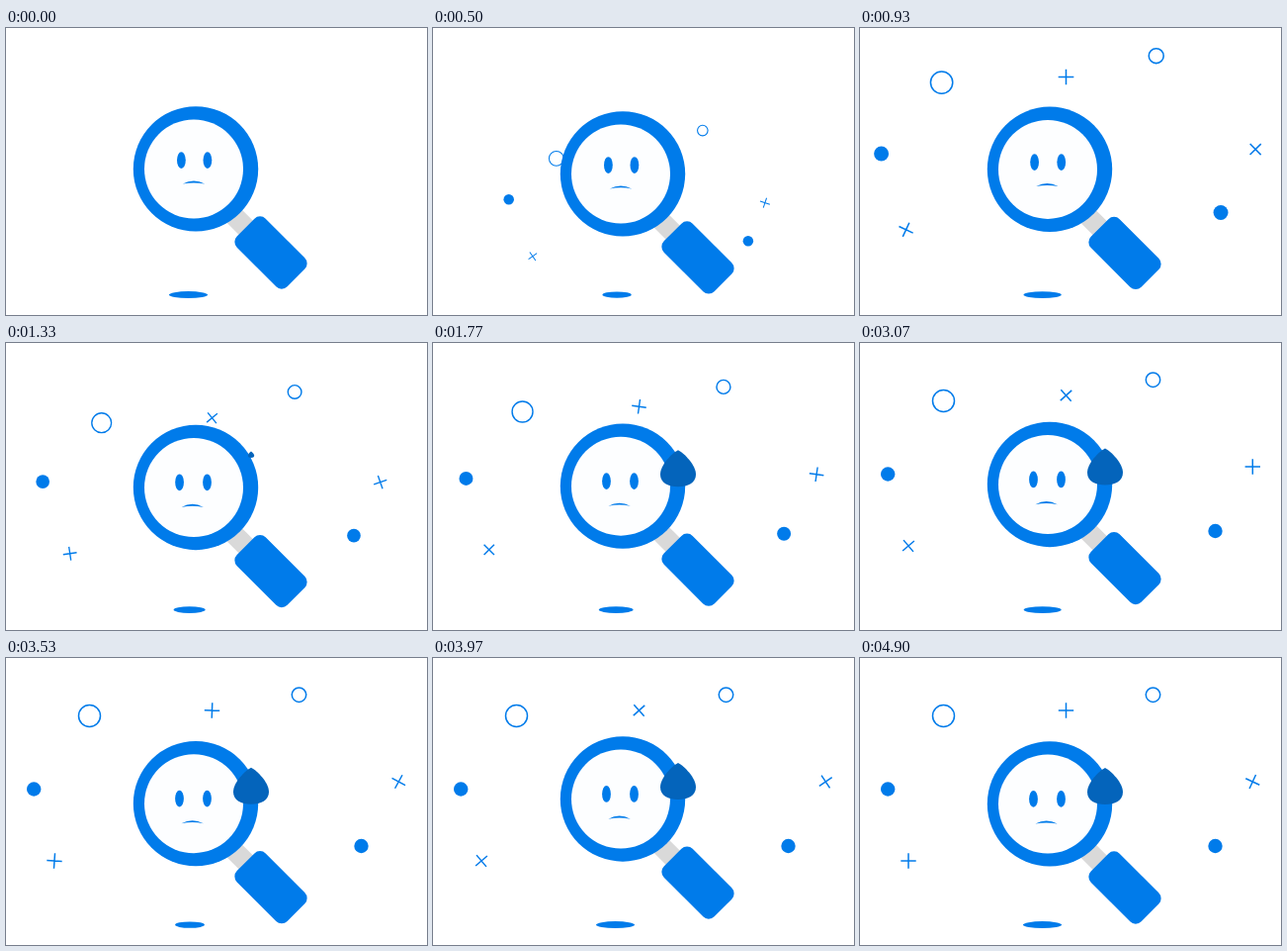
Write an HTML page that moves like this. It is 426 by 290 pixels and loops after 4930 ms.

```html
<!DOCTYPE html>
<html lang="en">
<head>
<meta charset="utf-8">
<title>Sad magnifying glass</title>
<style>
  html, body { margin: 0; width: 100%; height: 100%; overflow: hidden; background: #fff; }
  svg { display: block; width: 100vw; height: 100vh; }
  .fill { fill: #007bea; }
  .line { fill: none; stroke: #007bea; stroke-width: 1.5; }
</style>
</head>
<body>
<svg viewBox="0 0 426 290">
  <ellipse id="shadow" class="fill"/>
  <g id="wideBurst">
    <circle class="line" cx="84.5" cy="58.5" r="11"/>
    <path id="topCross" class="line" d="M-7.7 0H7.7M0-7.7V7.7"/>
    <path id="leftCross" class="line" d="M-7.7 0H7.7M0-7.7V7.7"/>
    <path id="rightCross" class="line" d="M-7.7 0H7.7M0-7.7V7.7"/>
  </g>
  <g id="tightBurst">
    <circle class="line" cx="296.5" cy="37.2" r="7.2"/>
    <circle class="fill" cx="28.2" cy="132.5" r="7.2"/>
    <circle class="fill" cx="359.5" cy="190" r="7.2"/>
  </g>
  <g id="glass">
    <g transform="translate(268 227) rotate(45)">
      <rect x="-60" y="-10" width="40" height="20" fill="#d9d9d9"/>
      <rect class="fill" x="-36" y="-20.5" width="72" height="41" rx="8"/>
    </g>
    <circle class="fill" cx="192" cy="142.4" r="63.2"/>
    <circle cx="190" cy="142.5" r="50" fill="#fdfeff"/>
    <ellipse id="leftEye" class="fill" rx="4.4" ry="8.4"/>
    <ellipse id="rightEye" class="fill" rx="4.4" ry="8.4"/>
    <path id="mouth" class="fill" d="M-11.2 1.6Q0-4.6 11.2 1.6Q0-.8-11.2 1.6Z"/>
    <path id="drop" fill="#0464bb" d="M0 0C6 3 18 15 18 24.5C18 33 10 37 0 37S-18 33-18 24.5C-18 15-6 3 0 0Z"/>
  </g>
</svg>
<script>
  const LOOP = 4930;
  const BOB = 486;          // half a bob
  const BOB_DELAY = 50;
  const BOB_END = 9 * BOB + BOB_DELAY;
  const ORIGIN = [208.5, 284];

  const linear = u => u;
  const smooth = u => u * u * (3 - 2 * u);
  const quadOut = u => u * (2 - u);
  const mix = (a, b, u) => a + (b - a) * u;
  const part = id => document.getElementById(id);

  // keys: [time, value, easing into this key]
  function track(t, keys) {
    if (t <= keys[0][0]) return keys[0][1];
    for (let i = 1; i < keys.length; i++) {
      const [t0, v0] = keys[i - 1];
      const [t1, v1, ease = linear] = keys[i];
      if (t < t1) return mix(v0, v1, ease((t - t0) / (t1 - t0)));
    }
    return keys[keys.length - 1][1];
  }

  const wideScale = [[400, 0], [667, 1.1, quadOut], [1255, .9, smooth], [2270, 1, smooth]];
  const tightScale = [[400, 0], [640, 1.1, quadOut], [1290, .95, smooth], [2370, 1, smooth]];
  const topSpin = [[0, 0], [930, -90], [1770, -172], [2570, -252], [3070, -312], [3970, -402], [4480, -450]];
  const leftSpin = [[0, 0], [930, -65], [1770, -135], [2570, -256], [3070, -310], [3970, -400], [4480, -450]];

  // 0 at the top of the bob, 1 at the bottom
  const bob = t => (1 - Math.cos(Math.PI * Math.max(0, t - BOB_DELAY) / BOB)) / 2;

  function move(id, x, y, extra = "") {
    part(id).setAttribute("transform", `translate(${x} ${y}) ${extra}`);
  }

  function burst(id, scale) {
    const [x, y] = ORIGIN;
    part(id).setAttribute("visibility", scale > 0 ? "visible" : "hidden");
    move(id, x, y, `scale(${scale}) translate(${-x} ${-y})`);
  }

  function setShadow(t) {
    const low = bob(t);
    const shadow = part("shadow");
    shadow.setAttribute("cx", 184.5 + 1.6 * low);
    shadow.setAttribute("cy", 269.6);
    shadow.setAttribute("rx", 19.6 - 5 * low);
    shadow.setAttribute("ry", 3.5 - .3 * low);
  }

  function draw(t) {
    setShadow(t);
    burst("wideBurst", track(t, wideScale));
    burst("tightBurst", track(t, tightScale));
    move("topCross", 208.5, 53, `rotate(${track(t, topSpin)})`);
    move("leftCross", 49, 205, `rotate(${track(t, leftSpin)})`);
    move("rightCross", 397.3, 125, `rotate(${-13 + .0628 * t})`);

    move("glass", 0, 5 * bob(Math.min(t, BOB_END)));
    const sad = track(t, [[533, 0], [1433, 1, smooth]]);
    move("leftEye", mix(177.4, 175.5, sad), mix(133.6, 137.4, sad));
    move("rightEye", mix(203.9, 203.5, sad), mix(133.6, 137.4, sad));
    move("mouth", mix(190, 188.6, sad), mix(156, 161, sad));
    const grown = track(t, [[1233, 0], [1600, 1, smooth]]);
    move("drop", 248, 106, `scale(${grown})`);
  }

  const start = performance.now();
  function tick() {
    draw((performance.now() - start) % LOOP);
    requestAnimationFrame(tick);
  }
  tick();
</script>
</body>
</html>
```
